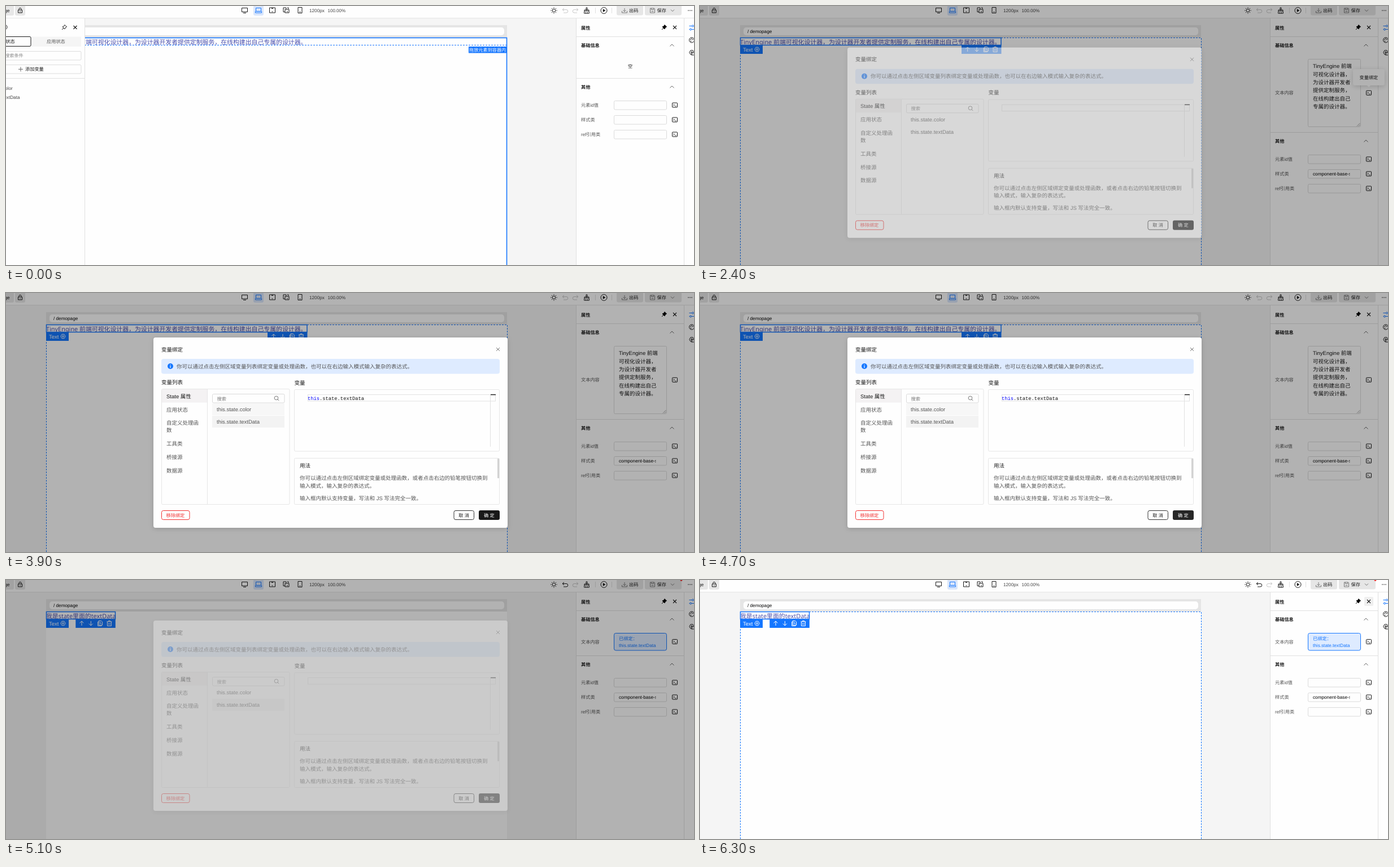
Animation, 1218 px wide and 460 px high, one loop 7400 ms. Source, as an HTML page:

```html
<!DOCTYPE html>
<html lang="zh">
<head>
<meta charset="utf-8">
<style>
  html, body { margin: 0; width: 100%; height: 100%; overflow: hidden; background: #f5f5f5; }
  svg { display: block; }
  text { font-family: "Liberation Sans", "Noto Sans CJK SC", "Noto Sans CJK", sans-serif; text-rendering: geometricPrecision; }
  .page { font-family: "Noto Sans", "Noto Sans CJK SC", "Noto Sans CJK", sans-serif; }
  .code { font-family: "Liberation Mono", monospace; }
</style>
</head>
<body>
<svg id="stage" width="1218" height="460" viewBox="0 0 1218 460"></svg>
<script>
const LOOP = 7400, BLUE = '#1476ff', INK = '#191919', SMALL = 8.2, BODY = 9.5;
const stage = document.getElementById('stage');

// Markup helpers; text is placed by its left edge and vertical centre.
const rect = (x, y, w, h, fill, stroke = 'none', r = 0, extra = '') =>
  `<rect x="${x}" y="${y}" width="${w}" height="${h}" fill="${fill}" stroke="${stroke}" rx="${r}" ${extra}/>`;
const text = (x, cy, str, size = SMALL, fill = INK, weight = 400, cls = '') =>
  `<text x="${x}" y="${cy + size * .37}" font-size="${size}" fill="${fill}" font-weight="${weight}" class="${cls}">${str}</text>`;
const icon = (x, y, d, color = INK, width = 1, fill = 'none') =>
  `<path transform="translate(${x} ${y})" d="${d}" fill="${fill}" stroke="${color}" stroke-width="${width}"/>`;
const line = (x1, y1, x2, y2, color = '#e0e0e0') => icon(0, 0, `M${x1} ${y1}L${x2} ${y2}`, color);
const group = (id, ...parts) => `<g id="${id}">${parts.join('')}</g>`;
const clipped = (x, y, w, h, inner) =>
  `<svg x="${x}" y="${y}" width="${w}" height="${h}" viewBox="${x} ${y} ${w} ${h}">${inner}</svg>`;
const dashed = (id, d) =>
  `<path id="${id}" d="${d}" fill="none" stroke="${BLUE}" stroke-dasharray="3 2"/>`;
const circle = r => `M${-r} 0a${r} ${r} 0 1 0 ${2 * r} 0a${r} ${r} 0 1 0 ${-2 * r} 0`;

const CROSS = 'M-3-3L3 3M3-3L-3 3';
const CHEVRON_UP = 'M-3.5 1.5L0-2L3.5 1.5';
const PIN = 'M1-4.5L4.5-1L2.5 0L1 3L-3-1L0-2.5ZM-1 1L-4 4';
const UNDO = 'M-2-4L-5-1.5L-2 1M-5-1.5H2A2.7 2.7 0 0 1 2 4H-3';
const REDO = 'M2-4L5-1.5L2 1M5-1.5H-2A2.7 2.7 0 0 0-2 4H3';
const SCRIPT = 'M-3.5-4H3.5Q4.5-4 4.5-3V3Q4.5 4 3.5 4H-3.5Q-4.5 4-4.5 3V-3Q-4.5-4-3.5-4M-2.5-1.7L-.7 0L-2.5 1.7M.5 2H2.7';
const DOWNLOAD = 'M0-4V2M-2.5-.5L0 2L2.5-.5M-4.5 1V4H4.5V1';
const GEAR = 'M-2-3.7H2L4.2 0L2 3.7H-2L-4.2 0Z' + circle(1.4);
const ARROW_UP = 'M0 4V-4M-3.5-.5L0-4L3.5-.5';
const ARROW_DOWN = 'M0-4V4M-3.5 .5L0 4L3.5 .5';
const COPY = 'M-2.5-4.5H2L4-2.5V3H-2.5ZM-2.5-2.5H-4V4.5H2.5V3M-1 0H2.5M-1-2H1';
const TRASH = 'M-4.5-3H4.5M-1.5-3V-4.5H1.5V-3M-3.5-3V4.5H3.5V-3M-1.2-.5V2.5M1.2-.5V2.5';
const sunRays = Array.from({ length: 8 }, (_, i) => {
  const c = Math.cos(i * Math.PI / 4), s = Math.sin(i * Math.PI / 4);
  return `M${4.2 * c} ${4.2 * s}L${5.7 * c} ${5.7 * s}`;
}).join('');

const toolbar = () => [
  rect(0, 0, 1218, 22, '#fefefe'), line(0, 21.5, 1218, 21.5, '#e5e5e5'),
  rect(-8, -4, 22, 21, '#e7e7e7', 'none', 3), text(-2.5, 8, 'ge'),
  rect(16, -4, 18, 21, '#e7e7e7', 'none', 3),
  icon(25, 8, 'M-3.5-1H3.5V4H-3.5ZM-2-1V-2.5A2 2 0 0 1 2-2.5V-1M0 1V2.5'),
  icon(422.5, 7.5, 'M-5-4H5V3H-5ZM-2.5 5H2.5'),
  rect(438, -1, 18, 18, '#d9e6fb', 'none', 3),
  icon(447, 7.5, 'M-4.5-4H4.5V2H-4.5ZM-5.5 2V4.5H5.5V2', BLUE),
  icon(471.5, 7.5, 'M-5-4.5H5V4.5H-5ZM-1 2.5H1M-1-4.5V-3H1V-4.5'),
  icon(496, 7.5, 'M-5 3V-4.5H0V-2M-5 3H-2M-2-1.5H5V4.5H-2ZM2-4.5H4V-2.5M1 2.5H3'),
  icon(520.5, 7.5, 'M-3.5-5H3.5V5H-3.5ZM-1 3H1'),
  text(537, 8, '1200px', SMALL, '#444'), text(569.5, 8, '100.00%', 8, '#444'),
  icon(970, 8, circle(2.8) + sunRays),
  group('undoIcon', icon(990, 8, UNDO, 'currentColor')), icon(1008, 8, REDO, '#c8c8c8'),
  icon(1028, 8, 'M-1-5H1V-1H-1ZM-4-1H4V1H-4ZM-4 1L-4.5 5H4.5L4 1M-1.5 5V3M1.5 5V3'),
  line(1043.5, 3, 1043.5, 13), icon(1058.5, 8, circle(5.5)),
  icon(1058.5, 8, 'M-1.5-2.5L2.5 0L-1.5 2.5Z', INK, .5, INK), line(1072.5, 3, 1072.5, 13),
  rect(1081, -4, 47, 20.5, '#e6e6e6', 'none', 3), icon(1095, 8, DOWNLOAD, '#777'), text(1103, 8, '出码'),
  rect(1131, -4, 65, 20.5, '#e6e6e6', 'none', 3),
  icon(1144.5, 8, 'M-4-4H3L4-3V4H-4ZM-2-4V-1.5H2V-4M-2 1.5H2', '#777'), text(1152.5, 8, '保存'),
  icon(1180, 8, 'M-3-1.5L0 1.5L3-1.5', '#777'),
  group('unsavedDot', rect(1193.5, -2, 4, 4, '#f23030', 'none', 2)),
  ...[1208, 1211, 1214].map(x => rect(x - .8, 7.2, 1.6, 1.6, INK, 'none', .8)),
];

const canvasPage = () => [
  rect(71, 34, 816, 22, '#e5e5e5'), rect(77, 38, 805, 14, '#fefefe', 'none', 5),
  text(84, 45, '/ demopage', SMALL, '#000'), rect(71, 56, 816, 404, '#fefefe'),
  group('longText', text(71, 63.5, 'TinyEngine 前端可视化设计器，为设计器开发者提供定制服务，在线构建出自己专属的设计器。', 10.88, '#4b50ae', 400, 'page')),
  group('boundText', clipped(71, 56, 122, 14, text(71, 63.5, '我是state里面的textData', 10.88, '#4b50ae', 400, 'page'))),
  group('bodySelection', rect(72, 56.5, 814.5, 420, 'none', BLUE, 0, 'stroke-width="1.6"')),
  group('dropHint', dashed('rowHover', 'M139 69.5H886'),
    rect(819, 72, 68, 11.5, BLUE), text(820, 77.8, '拖放元素到容器内', 8.16, '#fff')),
  dashed('textHover', 'M139 57.5H533.5V69.5H139'),
  dashed('bodyHover', 'M71.5 470V56.5H887.5V470'),
  group('selection',
    '<rect id="textFrame" x="71.5" y="56.5" height="13" fill="none" stroke="' + BLUE + '" stroke-width="1.5"/>',
    rect(71, 70, 40, 15, BLUE), text(76, 77.3, 'Text', BODY, '#fff'), icon(101, 77, GEAR, '#fff', .9),
    group('actions', rect(463, 70, 70.5, 15, BLUE),
      ...[ARROW_UP, ARROW_DOWN, COPY, TRASH].map((d, i) => icon(473.7 + i * 16.3, 77, d, '#fff')))),
];

const leftPanel = () => [
  rect(0, 22, 139, 438, '#fefefe'), line(139.5, 22, 139.5, 460),
  icon(-2.5, 37.5, circle(4.5)), icon(103, 38, PIN), icon(122.5, 38, CROSS, INK, 1.1),
  rect(44, 54.5, 89, 17.5, '#f5f5f5'), rect(-20, 54.5, 64, 17, '#fefefe', INK, 2),
  text(-17, 63, '页面状态'), text(72, 63, '应用状态', SMALL, '#555'),
  rect(-20, 80.5, 153, 15.5, '#fefefe', '#dcdcdc', 2), text(-2, 88, '搜索条件', SMALL, '#888'),
  rect(-20, 104.5, 153, 15.5, '#fefefe', '#dcdcdc', 2),
  icon(26, 112.3, 'M-4 0H4M0-4V4', '#666'), text(34, 112.3, '添加变量'),
  line(0, 128.5, 139, 128.5), text(-6, 145.5, 'color', SMALL, '#444'), text(-6, 161.8, 'textData', SMALL, '#444'),
];

const field = (y, label) => text(1018, y, label, SMALL, '#555') +
  rect(1076.5, y - 7.5, 93, 15.5, '#fefefe', '#dadada', 2) + icon(1184, y, SCRIPT);
const contentLabel = y => text(1018, y, '文本内容', SMALL, '#555') + icon(1184, y, SCRIPT);

const rightPanel = () => [
  rect(1009, 22, 209, 438, '#fefefe'), line(1009.5, 22, 1009.5, 460), line(1200.5, 22, 1200.5, 460),
  text(1018, 38.5, '属性', SMALL, INK, 700),
  group('pinHover', rect(1157, 30, 16, 16, '#ececec', 'none', 2)),
  group('closeHover', rect(1176, 30, 16, 16, '#efefef', 'none', 2)),
  icon(1165, 38, PIN, '#000', 1, '#000'), icon(1184, 38, CROSS, INK, 1.1),
  line(1010, 54.5, 1200, 54.5), text(1018, 70, '基础信息', SMALL, INK, 700), icon(1179, 70, CHEVRON_UP, '#666'),
  group('emptyInfo', text(1101, 106.5, '空')),
  group('plainInfo', group('scriptHover', rect(1176, 146, 16, 16, '#e9e9e9', 'none', 2)), contentLabel(154.3),
    rect(1076.5, 94.5, 93, 120, '#fefefe', '#dadada', 2), icon(1166, 211, 'M-3 2.5L2.5-3M0 2.5L2.5 0', '#888', .8),
    ...['TinyEngine 前端', '可视化设计器，', '为设计器开发者', '提供定制服务，', '在线构建出自己', '专属的设计器。']
      .map((s, i) => text(1085, 106.8 + i * 14.35, s, BODY))),
  group('boundInfo', contentLabel(109.5), rect(1076.5, 94.5, 93, 30.5, '#deebff', BLUE, 3),
    text(1085, 103.5, '已绑定：', SMALL, BLUE), text(1085, 115.5, 'this.state.textData', SMALL, BLUE)),
  group('others', line(1010, .5, 1200, .5), text(1018, 16, '其他', SMALL, INK, 700), icon(1179, 16, CHEVRON_UP, '#666'),
    field(48, '元素id值'), field(74, '样式类'), field(100, 'ref引用类'),
    group('className', clipped(1085, 66, 65.5, 16, text(1085, 73.8, 'component-base-style', SMALL, '#000')))),
  icon(1214, 38.5, 'M-4.5-3H5M-4.5 3H5', BLUE), icon(1216, 35.5, circle(1.5), BLUE, 1, '#fff'),
  icon(1212, 41.5, circle(1.5), BLUE, 1, '#fff'),
  icon(1214, 60.5, circle(4.5)), ...[[-2, -1], [0, -2.3], [-1.5, 2], [2, -1]].map(([x, y]) => icon(1214 + x, 60.5 + y, circle(.5))),
  icon(1214, 82.5, GEAR), rect(1214, 83, 5, 4, '#fefefe', INK),
  group('tooltip', rect(1156, 112, 56, 29, '#fefefe', 'none', 4, 'filter="url(#soft)"'),
    icon(1184, 141, 'M-3 0L0 3L3 0', 'none', 0, '#fefefe'), text(1167.5, 126.5, '变量绑定')),
];

const dialog = () => [
  rect(261, 79, 627, 338, '#fefefe', 'none', 4, 'filter="url(#soft)"'),
  text(275, 100, '变量绑定', BODY, INK, 500), icon(871, 100, CROSS, '#777'),
  rect(275, 117, 599, 26.5, '#deebff', 'none', 4), icon(291, 130, circle(5), 'none', 0, BLUE),
  icon(291, 130, 'M0-3V-1.8M0-.8V3', '#fff', 1.2),
  text(302, 130, '你可以通过点击左侧区域变量列表绑定变量或处理函数，也可以在右边输入模式输入复杂的表达式。', BODY, '#555'),
  text(275, 158.5, '变量列表', BODY), text(510.5, 159, '变量', BODY),
  rect(275.5, 170.5, 226.5, 205, '#fefefe', '#e6e6e6', 2), rect(276, 171, 80, 23.5, '#f4f2f3'), line(356.5, 171, 356.5, 375, '#e6e6e6'),
  text(284, 183, 'State 属性', BODY),
  ...[['应用状态', 207], ['自定义处理函', 230.5], ['数', 243.7], ['工具类', 267.5], ['桥接源', 291.5], ['数据源', 315]]
    .map(([s, y]) => text(284, y, s, BODY, '#555')),
  rect(365.5, 179.5, 127.5, 15.5, '#fefefe', '#dadada', 2), text(373.5, 187.5, '搜索', SMALL, '#777'),
  icon(478.5, 186.5, circle(3.3) + 'M2.4 2.4L4.8 4.8', '#777'),
  group('colorHover', rect(365, 196, 128, 21, '#f7f7f7')), group('dataHover', rect(365, 218, 128, 21, '#f3f3f3')),
  text(373, 206.5, 'this.state.color', BODY, '#555'), text(373, 228.5, 'this.state.textData', BODY, '#555'),
  rect(510.5, 171.5, 363, 109.5, '#fefefe', '#e6e6e6', 2), rect(534.5, 180.5, 332, 11.5, 'none', '#e2e2e2'),
  line(857.5, 180, 857.5, 273), rect(858, 179.8, 9, 1.5, '#222'),
  group('code', text(534, 186.3, '<tspan fill="#00f">this</tspan>.state.textData', 8.77, '#111', 400, 'code')),
  rect(510.5, 293.5, 363, 82, '#fefefe', '#e6e6e6', 2), rect(870, 294, 3, 35, '#d2d2d2', 'none', 1),
  text(520, 306.5, '用法', BODY, INK, 500),
  ...[['你可以通过点击左侧区域绑定变量或处理函数，或者点击右边的铅笔按钮切换到', 328.5],
    ['输入模式，输入复杂的表达式。', 342], ['输入框内默认支持变量，写法和 JS 写法完全一致。', 364.2]]
    .map(([s, y]) => text(520, y, s, BODY, '#555')),
  rect(275.5, 386.5, 49.5, 16, '#fefefe', '#f23030', 3), text(283.5, 394.7, '移除绑定', SMALL, '#f23030'),
  rect(793, 386.5, 35.5, 16, '#fefefe', '#333', 3), text(801.3, 394.7, '取 消'),
  group('confirm', rect(837, 386, 37, 17, 'currentColor', 'none', 3)), text(846, 394.7, '确 定', SMALL, '#fff', 500),
];

stage.innerHTML = `<defs><filter id="soft" x="-20%" y="-20%" width="140%" height="150%">
  <feDropShadow dx="0" dy="2" stdDeviation="4" flood-opacity=".16"/></filter></defs>` +
  rect(0, 0, 1218, 460, '#f5f5f5') + canvasPage().join('') + toolbar().join('') +
  group('leftPanel', ...leftPanel()) + rightPanel().join('') +
  group('mask', rect(0, 0, 1218, 460, '#000', 'none', 0, 'opacity=".3"')) + group('dialog', ...dialog());

const part = id => document.getElementById(id);
const show = (id, on) => part(id).setAttribute('visibility', on ? 'visible' : 'hidden');
const move = (id, x, y) => part(id).setAttribute('transform', `translate(${x} ${y})`);
const fade = (id, value) => part(id).setAttribute('opacity', value);
const clamp = x => Math.min(1, Math.max(0, x));

// Visible intervals of every part that switches on and off.
const schedule = {
  leftPanel: [[0, 1300]], bodySelection: [[0, 1300]], dropHint: [[0, 300], [700, 1300]], textHover: [[1000, 1300]],
  rowHover: [[0, 300], [700, 1300]], longText: [[0, 5000]], boundText: [[5000, LOOP]], selection: [[1300, LOOP]],
  bodyHover: [[2400, 5000], [5500, LOOP]], emptyInfo: [[0, 1300]], plainInfo: [[1300, 5000]], boundInfo: [[5000, LOOP]],
  className: [[1300, LOOP]], scriptHover: [[2200, 2400]], tooltip: [[2400, 2800]],
  mask: [[2400, 5200]], colorHover: [[3200, 5000]], dataHover: [[3500, 5200]], code: [[3800, 5000]],
  unsavedDot: [[5000, LOOP]], pinHover: [[6200, 6300]], closeHover: [[6300, LOOP]],
};

function render(now) {
  const t = Math.floor(now % LOOP / 100) * 100; // everything advances in 100 ms steps
  for (const id in schedule) show(id, schedule[id].some(([from, to]) => t >= from && t < to));

  const bound = t >= 5000, selected = t >= 1300;
  move('others', 0, bound ? 134 : selected ? 224 : 128);
  move('actions', bound ? -339.7 : 0, 0);
  part('textFrame').setAttribute('width', bound ? 122 : 461.5);
  part('undoIcon').setAttribute('color', bound ? INK : '#c8c8c8');
  part('confirm').setAttribute('color', t >= 4700 ? '#262626' : INK);
  fade('tooltip', clamp((2800 - t) / 200));

  // The dialog slides and fades over a mask that stays at full strength.
  const shown = clamp((t - 2300) / 200) * clamp((5200 - t) / 300);
  fade('dialog', shown);
  move('dialog', 0, -10.5 * (1 - shown));
  requestAnimationFrame(render);
}
requestAnimationFrame(render);
</script>
</body>
</html>
```
